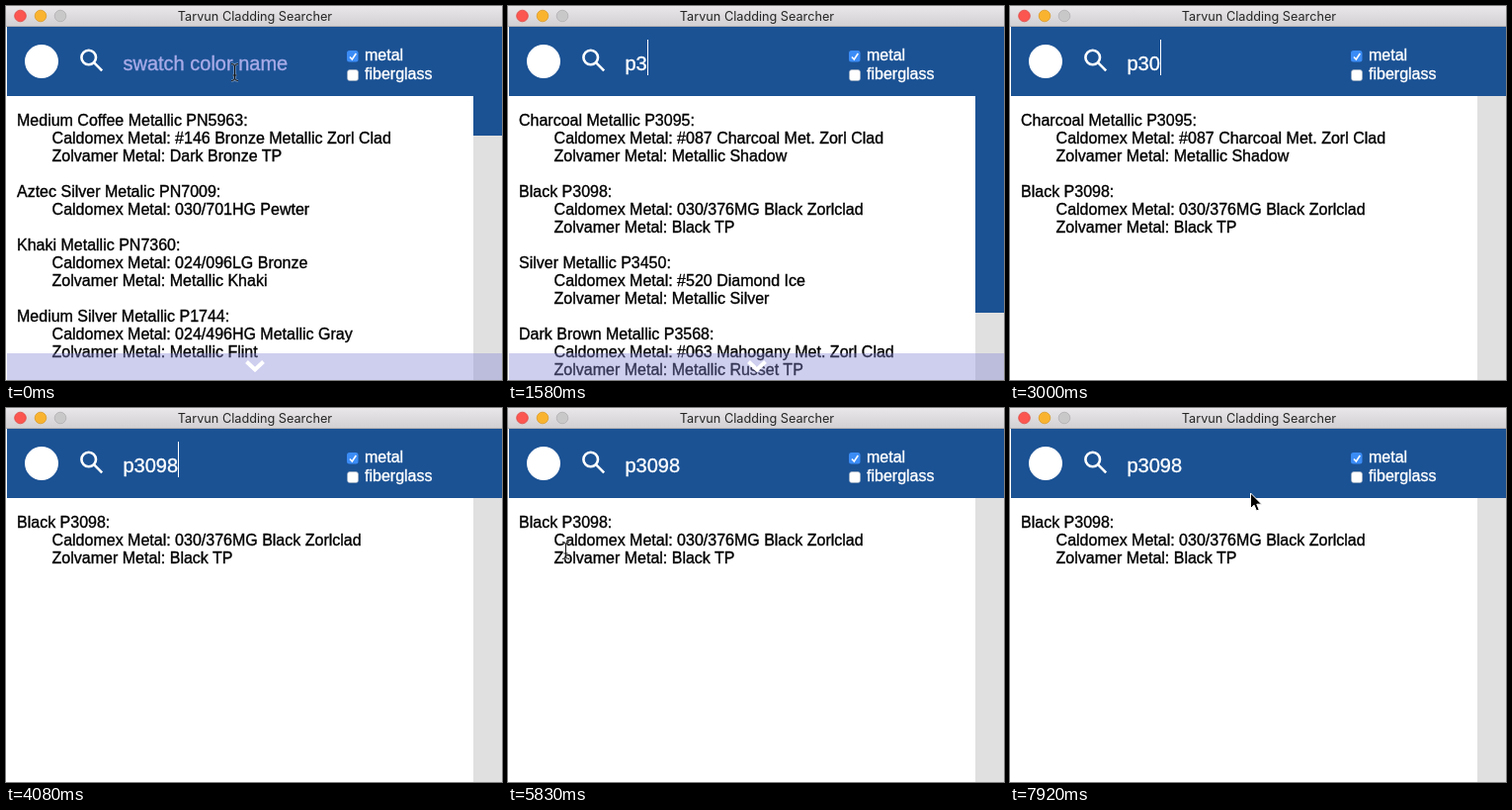
Animation of 502x378 px, one loop 8000 ms. Source, as an HTML page:

```html
<!DOCTYPE html>
<html lang="en">
<head>
<meta charset="utf-8">
<title>Tarvun Cladding Searcher</title>
<style>
  html, body { margin: 0; width: 502px; height: 378px; overflow: hidden; background: #fff; }
  svg { display: block; font: 16px "Liberation Sans", Arial, sans-serif; }
  /* a thin outline gives the heavier smoothed text */
  text { stroke-width: .35px; }
</style>
</head>
<body>
<svg width="502" height="378">
  <defs>
    <linearGradient id="chrome" x2="0" y2="1">
      <stop stop-color="#e9e7e9"/><stop offset="1" stop-color="#d1cfd1"/>
    </linearGradient>
  </defs>

  <g id="list" stroke="#000"></g>
  <rect x="473" y="91" width="29" height="287" fill="#e0e0e0"/>
  <rect id="thumb" x="473" y="91" width="29" fill="#1b5294"/>
  <g id="more">
    <rect x="1" y="351" width="501" height="27" fill="#8484d7" fill-opacity=".4"/>
    <path d="M243.500 359.500l8.500 8 8.500-8" fill="none" stroke="#fff" stroke-width="4"/>
  </g>

  <rect width="502" height="21" fill="url(#chrome)"/>
  <path d="M0 20.500H502" stroke="#b5b3b5"/>
  <g stroke-width=".8">
    <circle cx="14.500" cy="10" r="5.800" fill="#fc5650" stroke="#df4540"/>
    <circle cx="35" cy="10" r="5.800" fill="#f9b32f" stroke="#dc9c28"/>
    <circle cx="55" cy="10" r="5.800" fill="#c9c8c9" stroke="#b1b0b1"/>
  </g>
  <text x="252" y="15" text-anchor="middle" fill="#262626" font-family="Inter, sans-serif" font-size="12.700">Tarvun Cladding Searcher</text>

  <rect x="1" y="21" width="501" height="70" fill="#1b5294"/>
  <circle cx="36" cy="56" r="17" fill="#fff"/>
  <g fill="none" stroke="#fff" stroke-width="2.600">
    <circle cx="83.700" cy="52" r="7.300"/>
    <path d="M89 57.200l8.200 8.200"/>
  </g>
  <text id="field" x="118.500" y="65" font-size="20"></text>
  <rect id="caret" y="34" width="1" height="36" fill="#fff"/>

  <rect x="345" y="45" width="11.500" height="11.500" rx="2.500" fill="#3b8cf6"/>
  <path d="M348 51.500l2.300 2.500 4-6" fill="none" stroke="#fff" stroke-width="1.600"/>
  <rect x="345.500" y="64.500" width="11" height="11" rx="2.500" fill="#fff" stroke="#a3b0c0" stroke-width=".6"/>
  <g fill="#fff" stroke="#fff">
    <text x="363" y="55">metal</text>
    <text x="363" y="74">fiberglass</text>
  </g>

  <g id="pointer">
    <g id="beam" fill="none">
      <path id="bar" d="M-3.500-8.500Q0-8.500 0-6V6Q0 8.500-3.500 8.500M3.500-8.500Q0-8.500 0-6M0 6Q0 8.500 3.500 8.500M-2 3H2" stroke="#fff" stroke-opacity=".4" stroke-width="2.600"/>
      <use href="#bar" id="ink"/>
      <path d="M-3.500-8.500Q0-8.500 0-6V6Q0 8.500-3.500 8.500M3.500-8.500Q0-8.500 0-6M0 6Q0 8.500 3.500 8.500M-2 3H2" stroke="#111"/>
    </g>
    <path id="arrow" d="M0 0V15.500L3.600 12.200 6 18 8.700 16.800 6.300 11.200H11.200Z" stroke="#fff"/>
  </g>
</svg>
<script>
const TICKS = 96, PER_SECOND = 12;
const $ = id => document.getElementById(id);
$("ink").remove();

// swatch name, Caldomex match, Zolvamer match
const swatches = [
  ["Medium Coffee Metallic PN5963", "#146 Bronze Metallic Zorl Clad", "Dark Bronze TP"],
  ["Aztec Silver Metalic PN7009", "030/701HG Pewter"],
  ["Khaki Metallic PN7360", "024/096LG Bronze", "Metallic Khaki"],
  ["Medium Silver Metallic P1744", "024/496HG Metallic Gray", "Metallic Flint"],
  ["Charcoal Metallic P3095", "#087 Charcoal Met. Zorl Clad", "Metallic Shadow"],
  ["Black P3098", "030/376MG Black Zorlclad", "Black TP"],
  ["Silver Metallic P3450", "#520 Diamond Ice", "Metallic Silver"],
  ["Dark Brown Metallic P3568", "#063 Mahogany Met. Zorl Clad", "Metallic Russet TP"],
];
const thumbHeights = { "": 40, p: 41, p3: 219 };

// [tick, value] pairs, each holding until the next
const typed = [[0, ""], [15, "p"], [19, "p3"], [22, "p30"], [27, "p308"], [36, "p30"], [47, "p309"], [49, "p3098"]];
const caretToggles = [3, 9, 15, 33, 36, 42, 47, 55, 61, 67, 73, 79, 85, 87];
// [tick, x, y] of the mouse, hidden while typing
const path = [[0, 231, 67], [1, 260, 66], [58, 250, 69], [67, 64, 146], [70, 58, 144],
  [74, 70, 147], [79, 70, 147], [83, 104, 149], [89, 104, 149], [95, 243, 86], [96, 243, 86]];

const show = (id, on) => $(id).setAttribute("visibility", on ? "visible" : "hidden");

function drawList(query) {
  const lines = [];
  for (const [name, first, second] of swatches) {
    if (!name.toLowerCase().includes(query)) continue;
    lines.push([11, name + ":"], [46.6, "Caldomex Metal: " + first]);
    if (second) lines.push([46.6, "Zolvamer Metal: " + second]);
    lines.push([11, ""]);
  }
  $("list").innerHTML = lines.slice(0, 16)
    .map(([x, s], i) => `<text x="${x}" y="${121 + 18 * i}">${s}</text>`).join("");
}

function mouseAt(tick) {
  const i = path.findIndex(p => p[0] > tick);
  const [t0, x0, y0] = path[i - 1], [t1, x1, y1] = path[i];
  const k = (tick - t0) / (t1 - t0);
  return [x0 + (x1 - x0) * k, y0 + (y1 - y0) * k];
}

let shownQuery = null, shownTick = -1;

function draw(tick) {
  const query = typed.filter(k => k[0] <= tick).pop()[1];
  if (query !== shownQuery) {
    shownQuery = query;
    drawList(query);
    const height = thumbHeights[query] || 0;
    const color = query ? "#fff" : "#a9abe8";
    $("thumb").setAttribute("height", height);
    show("more", height);
    $("field").textContent = query || "swatch color name";
    $("field").setAttribute("fill", color);
    $("field").setAttribute("stroke", color);
    $("caret").setAttribute("x", Math.round(118 + 11.12 * query.length + 0.4));
  }
  show("caret", caretToggles.filter(t => t <= tick).length % 2);

  const visible = tick < 15 || tick >= 58;
  const [x, y] = tick < 15 ? path[Math.min(tick, 1)].slice(1) : mouseAt(tick);
  const overText = y < 78 || y > 107;
  $("pointer").setAttribute("transform", `translate(${Math.round(x) + 0.5} ${Math.round(y)})`);
  show("beam", visible && overText);
  show("arrow", visible && !overText);
}

function frame() {
  // a few ms of lead keeps rounded times on the right tick
  const tick = Math.floor((performance.now() + 5) * PER_SECOND / 1000) % TICKS;
  if (tick !== shownTick) draw(shownTick = tick);
  requestAnimationFrame(frame);
}
frame();
</script>
</body>
</html>
```
